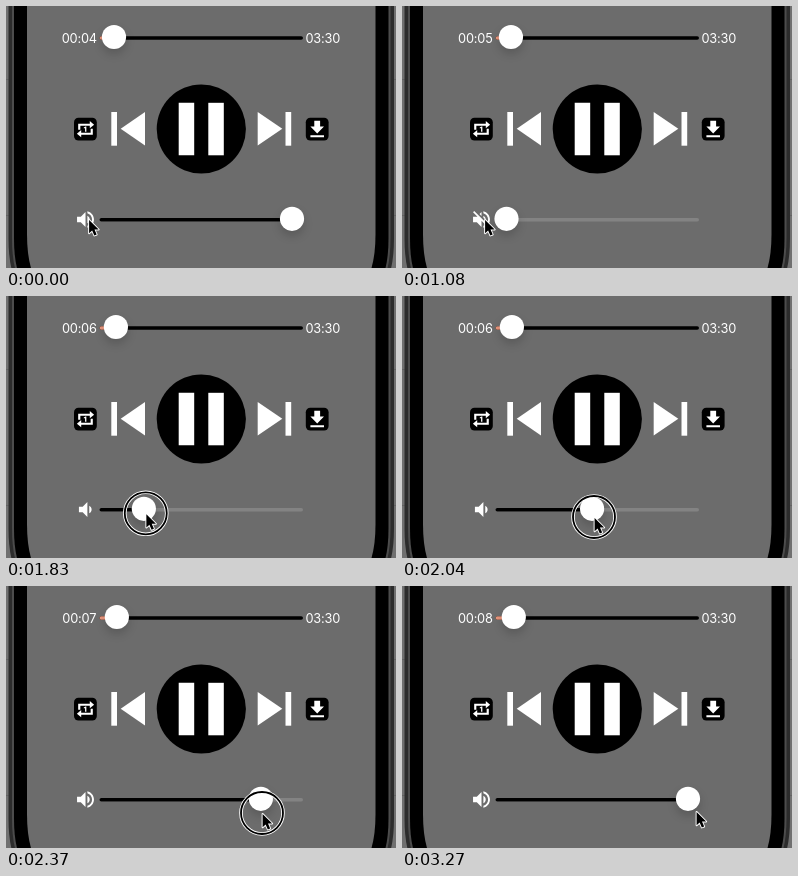
Recreate the animation shown at these times as an HTML page with a canvas. Size 390 by 262 pixels, loop 3600 ms.

```html
<!DOCTYPE html>
<html lang="en">
<head>
<meta charset="utf-8">
<title>Music player</title>
<style>
html, body { margin: 0; width: 100%; height: 100%; overflow: hidden; background: #6c6c6c; }
canvas { display: block; width: 390px; height: 262px; }
</style>
</head>
<body>
<canvas id="stage"></canvas>
<script>
const W = 390, H = 262, LOOP = 3600, TICK = 30;
const MIN_X = 104.5, MAX_X = 286, DRAG_LAG = 8;
const canvas = document.getElementById('stage');
const ctx = canvas.getContext('2d');
const dpr = window.devicePixelRatio || 1;
canvas.width = W * dpr;
canvas.height = H * dpr;

const icons = {
  up: new Path2D('M3 9v6h4l5 5V4L7 9H3zm13.5 3c0-1.77-1.02-3.29-2.5-4.03v8.05c1.48-.73 2.5-2.25 2.5-4.02zM14 3.23v2.06c2.89.86 5 3.54 5 6.71s-2.11 5.85-5 6.71v2.06c4.01-.91 7-4.49 7-8.77s-2.99-7.86-7-8.77z'),
  down: new Path2D('M18.5 12c0-1.77-1.02-3.29-2.5-4.03v8.05c1.48-.73 2.5-2.25 2.5-4.02zM5 9v6h4l5 5V4L9 9H5z'),
  off: new Path2D('M16.5 12c0-1.77-1.02-3.29-2.5-4.03v2.21l2.45 2.45c.03-.2.05-.41.05-.63zm2.5 0c0 .94-.2 1.82-.54 2.64l1.51 1.51C20.63 14.91 21 13.5 21 12c0-4.28-2.99-7.86-7-8.77v2.06c2.89.86 5 3.54 5 6.71zM4.27 3L3 4.27 7.73 9H3v6h4l5 5v-6.73l4.25 4.25c-.67.52-1.42.93-2.25 1.18v2.06c1.38-.31 2.63-.95 3.69-1.81L19.73 21 21 19.73l-9-9L4.27 3zM12 4L9.91 6.09 12 8.18V4z'),
  repeat: new Path2D('M6 8h11v3l5-4.2-5-4.2v3H3.5v7H6zM18 16H7v-3l-5 4.2 5 4.2v-3h13.5v-7H18zM13 15V9h-1l-2 1v1h1.5v4z'),
  save: new Path2D('M19 9h-4V3H9v6H5l7 7 7-7zM5 18v2h14v-2H5z')
};
const arrow = new Path2D('M0 0V15.2L3.5 12 6 17.8 8.7 16.7 6.2 11H11Z');
const phone = new Path2D('M8 0V232Q8 250 11 262H379.5Q382.5 250 382.5 232V0Z');
const screen = new Path2D('M21 0V228Q21 248 25 262H365.5Q369.5 248 369.5 228V0Z');

// time, x, y of the pointer
const track = [
  [0, 82.5, 213], [1170, 82.5, 213], [1280, 96, 214], [1380, 105, 215],
  [1650, 105, 215], [1740, 120, 216], [2040, 192, 221], [2160, 220, 224],
  [2370, 256, 227], [2610, 284, 226], [2710, 294, 225], [LOOP, 294, 225]
];
const presses = [[480, 720], [1410, 2715]];

const clamp = (v, lo, hi) => Math.min(hi, Math.max(lo, v));
const smooth = p => p * p * (3 - 2 * p);
const countPast = (t, times) => times.filter(s => t >= s).length;

function slope(i, k) {
  const a = track[i - 1], b = track[i], c = track[i + 1];
  if (!a || !c) return 0;
  const l = (b[k] - a[k]) / (b[0] - a[0]), r = (c[k] - b[k]) / (c[0] - b[0]);
  return l * r <= 0 ? 0 : 2 * l * r / (l + r);
}

function pointer(t) {
  let i = 0;
  while (i < track.length - 2 && t >= track[i + 1][0]) i++;
  const a = track[i], b = track[i + 1], d = b[0] - a[0], p = (t - a[0]) / d, q = 1 - p;
  return [1, 2].map(k =>
    a[k] * q * q * (1 + 2 * p) + b[k] * smooth(p) +
    d * p * q * (q * slope(i, k) - p * slope(i + 1, k)));
}

function volumeX(t) {
  if (t < 1470) return MAX_X + (MIN_X - MAX_X) * smooth(clamp((t - 690) / 300, 0, 1));
  return clamp(pointer(t - DRAG_LAG)[0], MIN_X, MAX_X);
}

function rect(x, y, w, h, color, r = 0) {
  ctx.fillStyle = color;
  ctx.beginPath();
  ctx.roundRect(x, y, w, h, r);
  ctx.fill();
}

function disc(x, y, r, color) {
  ctx.fillStyle = color;
  ctx.beginPath();
  ctx.arc(x, y, r, 0, 7);
  ctx.fill();
}

function poly(color, ...pts) {
  ctx.fillStyle = color;
  ctx.beginPath();
  pts.forEach(p => ctx.lineTo(...p));
  ctx.fill();
}

function outline(color, width, path) {
  ctx.strokeStyle = color;
  ctx.lineWidth = width;
  ctx.stroke(path);
}

function icon(path, cx, cy, s) {
  ctx.save();
  ctx.translate(cx - 12 * s, cy - 12 * s);
  ctx.scale(s, s);
  ctx.fillStyle = '#fff';
  ctx.fill(path);
  ctx.restore();
}

function slider(x, y, low, high) {
  rect(93.5, y - 0.8, 203.5, 3.6, high, 1.8);
  rect(93.5, y - 0.8, x - 93.5, 3.6, low, 1.8);
  ctx.save();
  ctx.shadowColor = 'rgba(0,0,0,.17)';
  ctx.shadowBlur = 10 * dpr;
  ctx.shadowOffsetY = 5 * dpr;
  disc(x, y, 12.1, '#fff');
  ctx.restore();
}

function label(text, x) {
  ctx.font = '12.8px Inter, Roboto, sans-serif';
  ctx.letterSpacing = '-0.2px';
  ctx.textAlign = 'center';
  ctx.fillStyle = '#fff';
  ctx.fillText(text, x, 36.8);
}

function body() {
  rect(0, 0, W, H, '#707070');
  rect(0, 73, W, 1, '#626262');
  rect(0, 209, W, 1, '#626262');
  outline('#2c2c2c', 11, phone);
  outline('#4c4c4c', 4, phone);
  ctx.fillStyle = '#000';
  ctx.fill(phone);
  ctx.fillStyle = '#6c6c6c';
  ctx.fill(screen);
}

function controls() {
  disc(195.3, 123, 44.6, '#000');
  rect(172.7, 96.8, 15.5, 52.5, '#fff');
  rect(202.3, 96.8, 15.5, 52.5, '#fff');
  rect(105.3, 106, 5.7, 33.7, '#fff');
  poly('#fff', [114.7, 122.8], [139, 106], [139, 139.6]);
  rect(279.5, 106, 5.7, 33.7, '#fff');
  poly('#fff', [276.3, 122.8], [251.7, 106], [251.7, 139.6]);
  rect(68, 111.8, 22.8, 22.8, '#000', 4.5);
  icon(icons.repeat, 79.5, 123.2, 0.86);
  rect(299.8, 111.8, 22.8, 22.8, '#000', 4.5);
  icon(icons.save, 311.2, 123.5, 0.97);
}

function ring(t, x, y) {
  for (const [from, to] of presses) {
    const a = Math.min((t - from + TICK) / 90, (to + 60 - t) / 60, 1);
    if (a <= 0) continue;
    const circle = new Path2D();
    circle.arc(x, y, 21 + 2 * (1 - a), 0, 7);
    ctx.save();
    ctx.globalAlpha = a;
    outline('#fff', 3.6, circle);
    outline('#000', 1.8, circle);
    ctx.restore();
  }
}

function cursor(x, y) {
  ctx.save();
  ctx.translate(x + 0.6, y + 1);
  ctx.scale(0.87, 0.87);
  ctx.lineJoin = 'round';
  outline('#fff', 2.2, arrow);
  ctx.fillStyle = '#000';
  ctx.fill(arrow);
  ctx.restore();
}

function draw(t) {
  ctx.setTransform(dpr, 0, 0, dpr, 0, 0);
  const [x, y] = pointer(t);
  const vx = volumeX(t);
  const level = (vx - MIN_X) / (MAX_X - MIN_X);
  const muted = t >= 690 && t < 1680;

  body();
  controls();
  label('00:0' + (4 + countPast(t, [480, 1290, 2280, 3270])), 73.3);
  label('03:30', 316.8);
  slider(108 + 0.95 * countPast(t, [120, 1170, 2100, 3090]), 31, '#e8957c', '#000');
  icon(muted ? icons.off : level < 0.5 ? icons.down : icons.up, 79.5, 213.5, 0.94);
  slider(vx, 212.8, '#000', '#838383');
  ring(t, x, y);
  cursor(x, y);
}

function loop(now) {
  draw(Math.floor(now % LOOP / TICK) * TICK);
  requestAnimationFrame(loop);
}
draw(0);
requestAnimationFrame(loop);
</script>
</body>
</html>
```
